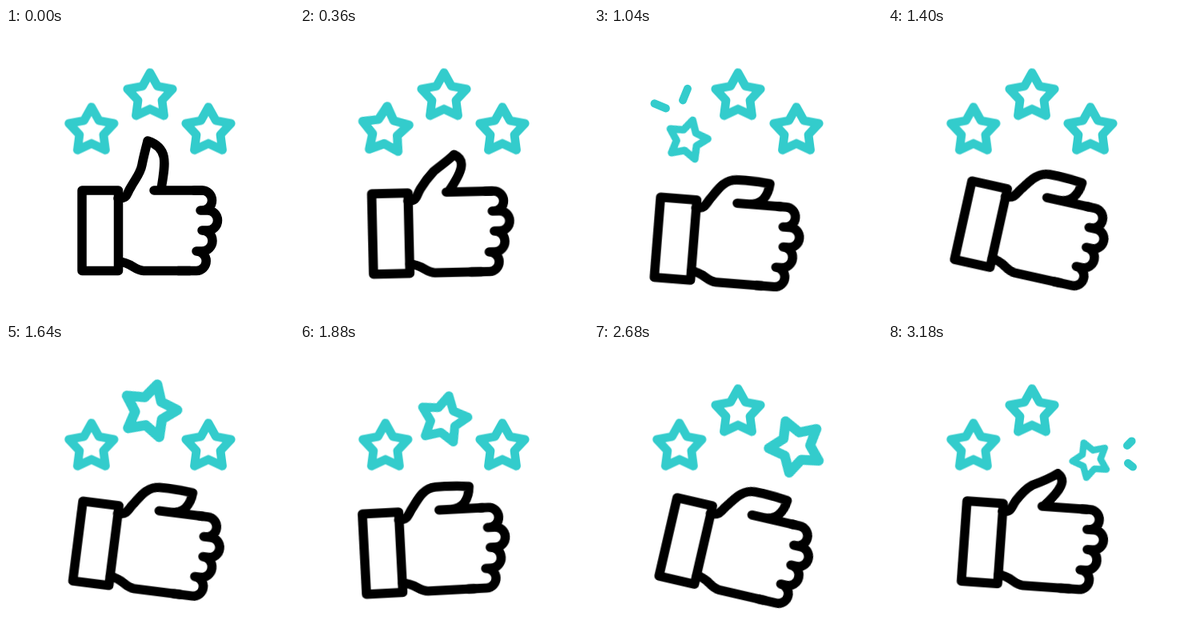
An HTML page without scripts for the animation above (3200 ms loop, 360x360 px).

```html
<!DOCTYPE html>
<html lang="en">
<head>
<meta charset="utf-8">
<title>Thumbs up rating</title>
<style>
html, body { margin: 0; width: 100%; height: 100%; overflow: hidden; background: #fff; }
svg { display: block; width: 100vw; height: 100vh; }
path, rect { fill: none; stroke-linecap: round; stroke-linejoin: round; }

.hand { stroke: #000; stroke-width: 11.5; transform-origin: 180px 253px; }
.hand, .thumb, .fingers, .star, .ray { animation: 3.2s linear infinite; }
.hand { animation-name: sway; }
.thumb { animation-name: curl; }
.fingers { animation-name: stretch; }

.star, .ray { stroke: #33cccc; stroke-width: 10.8; }
.ray { stroke-width: 10; }
.left .star { animation-name: pop-left; }
.mid .star { animation-name: pop-mid; }
.right .star { animation-name: pop-right; }

.ray { opacity: 0; stroke-dasharray: 0 20; animation-name: burst; }
.mid .ray { animation-delay: 1.09s; }
.right .ray { animation-name: burst-end; }

@keyframes sway {
  0%, 6.3% { transform: translate(0, 0) rotate(0deg); animation-timing-function: ease-in-out; }
  18.75% { transform: translate(-13px, 7px) rotate(-4deg); }
  24% { transform: translate(-16px, 9px) rotate(-2.2deg); }
  29.4% { transform: translate(-18px, 13px) rotate(2.3deg); }
  32.5% { transform: translate(-16px, 15px) rotate(4.5deg); }
  39% { transform: translate(-9px, 15px) rotate(9.5deg); }
  43.75% { transform: translate(-3px, 5.5px) rotate(12.5deg); }
  46% { transform: translate(-1px, 3px) rotate(12.8deg); animation-timing-function: ease-in-out; }
  58.75% { transform: translate(-14.6px, 5px) rotate(-3deg); }
  64% { transform: translate(-17px, 8px) rotate(-2deg); }
  69.4% { transform: translate(-18px, 13px) rotate(2.3deg); }
  72.5% { transform: translate(-16px, 15px) rotate(4.5deg); }
  79% { transform: translate(-9px, 15px) rotate(9.5deg); }
  83.75% { transform: translate(-4.6px, 7px) rotate(13deg); }
  87% { transform: translate(-1px, 4px) rotate(12.8deg); animation-timing-function: ease-in-out; }
  100% { transform: translate(0, -1px) rotate(4deg); }
}

@keyframes curl {
  0%, 6.3% { d: path("M140 213C153 213 150 208 156 199C162 188 168 182 170 171C172 160 175 150 177 141C204 150 199 170 194 201M185 203L245 203"); }
  12.5% { d: path("M140 213C152 213 150 208 156 198C162 189 167 183 174 178C180 175 196 167 204.5 160C217 167 211 180 191 202M189 203L245 203"); }
  18.75% { d: path("M140 213C152 213 151 208 156 200C161 191 167 183 176 177.5C186 172.5 205 171 219 169.5C222 192 204 188 188 203M188 203L245 203"); }
  23%, 88% { d: path("M140 213C151 213 151 209 157 200C164 191 171 175 188 174C202 173.5 217 174 230 175.5C229 190 222 203 206 203M191 203L245 203"); }
  100% { d: path("M140 213C152 213 150 208 156 198C162 189 167 183 174 178C180 175 196 167 204.5 160C217 167 211 180 191 202M189 203L245 203"); }
}

@keyframes stretch {
  0%, 6.3% { transform: translateX(0); }
  18.75% { transform: translateX(5.5px); }
  23%, 88% { transform: translateX(7.5px); }
  100% { transform: translateX(4px); }
}

@keyframes pop-left {
  0%, 10% { transform: translate(0, 0) rotate(0deg) scale(1); }
  15.6% { transform: translate(-1px, -1px) rotate(20deg) scale(1.13); }
  18.75% { transform: translate(-2px, -1.5px) rotate(27deg) scale(1.2); }
  21.2% { transform: translate(-2px, -2px) rotate(28deg) scale(1.23); }
  25% { transform: translate(3px, 6px) rotate(24deg) scale(1.03); }
  30.6% { transform: translate(9px, 13px) rotate(17deg) scale(.76); }
  32.5% { transform: translate(10px, 11.5px) rotate(15deg) scale(.86); }
  40%, 100% { transform: translate(0, 0) rotate(0deg) scale(1); }
}

@keyframes pop-mid {
  0%, 44% { transform: translate(0, 0) rotate(0deg) scale(1); }
  49.7% { transform: translate(0, -1px) rotate(14deg) scale(1.13); }
  54.7% { transform: translate(-1px, -3px) rotate(20deg) scale(1.23); }
  58.75% { transform: translate(-.5px, 9px) rotate(12.5deg) scale(1.03); }
  64.7% { transform: translate(0, 16px) rotate(8deg) scale(.76); }
  66.6% { transform: translate(0, 14px) rotate(7deg) scale(.86); }
  74%, 100% { transform: translate(0, 0) rotate(0deg) scale(1); }
}

@keyframes pop-right {
  0%, 78.1% { transform: translate(0, 0) rotate(0deg) scale(1); }
  83.75% { transform: translate(-.8px, -.5px) rotate(-22deg) scale(1.14); }
  89.4% { transform: translate(-1px, -2px) rotate(-26deg) scale(1.22); }
  93% { transform: translate(0, 8px) rotate(-25deg) scale(1.03); }
  100% { transform: translate(.5px, 17px) rotate(-22deg) scale(.75); }
}

@keyframes burst {
  0%, 30.6% { opacity: 0; stroke-dasharray: 0 20; stroke-dashoffset: 0; }
  30.61% { opacity: 1; stroke-dasharray: 0 20; stroke-dashoffset: 0; }
  32.5% { opacity: 1; stroke-dasharray: 4.2 20; stroke-dashoffset: 0; }
  35% { opacity: 1; stroke-dasharray: 5 20; stroke-dashoffset: -3; }
  38.1% { opacity: 1; stroke-dasharray: 0 20; stroke-dashoffset: -10; }
  38.11%, 100% { opacity: 0; stroke-dasharray: 0 20; stroke-dashoffset: -10; }
}

@keyframes burst-end {
  0%, 98.4% { opacity: 0; stroke-dasharray: 0 20; }
  98.41% { opacity: 1; stroke-dasharray: 0 20; }
  99.4%, 100% { opacity: 1; stroke-dasharray: 2 20; }
}
</style>
</head>
<body>
<svg viewBox="0 0 360 360">
  <defs>
    <path id="star" d="M0-29.7L9.3-12.8 28.2-9.2 15 4.9 17.5 24 0 15.8-17.5 24-15 4.9-28.2-9.2-9.3-12.8Z"/>
  </defs>

  <g class="left">
    <g transform="translate(106.8 128.5)"><use class="star" href="#star"/></g>
    <path class="ray" pathLength="10" d="M90 100.5L56 86"/>
    <path class="ray" pathLength="10" d="M111 90.5L125 56"/>
  </g>
  <g class="mid">
    <g transform="translate(180 85.5)"><use class="star" href="#star"/></g>
    <path class="ray" pathLength="10" d="M167 57L151 37"/>
    <path class="ray" pathLength="10" d="M193 57L209 37"/>
  </g>
  <g class="right">
    <g transform="translate(253 128.5)"><use class="star" href="#star"/></g>
    <path class="ray" pathLength="10" d="M299 127L327 99"/>
    <path class="ray" pathLength="10" d="M300 149L330 172"/>
  </g>

  <g class="hand">
    <rect x="95" y="203" width="45.5" height="100.5"/>
    <path class="thumb" d="M140 213C153 213 150 208 156 199C162 188 168 182 170 171C172 160 175 150 177 141C204 150 199 170 194 201M185 203L245 203"/>
    <path class="fingers" d="M235 203H245a12.5 12.5 0 0 1 0 25M243 228H252a12.5 12.5 0 0 1 0 25H245a13 13 0 0 1 0 26H238a12.2 12.2 0 0 1 0 24.4H215"/>
    <path d="M230 303.4H172C160 303 157 293 141 292"/>
  </g>
</svg>
</body>
</html>
```
